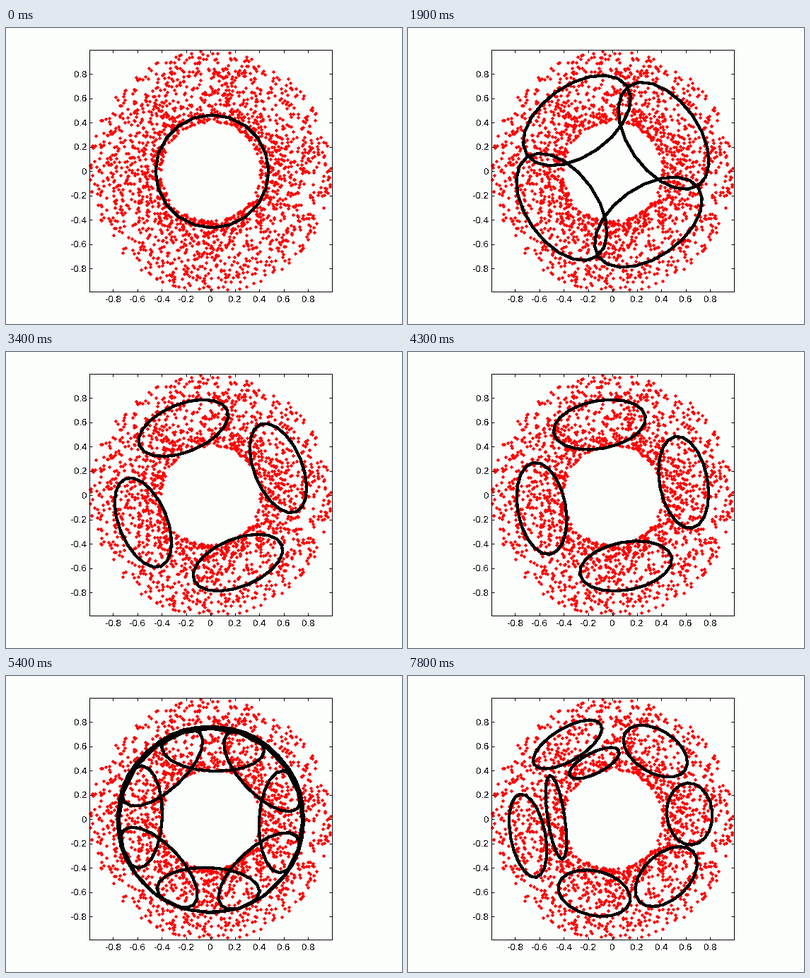
Animation, 560 px wide and 420 px high, one loop 8000 ms. Source, as a matplotlib script:

```python
import numpy as np
import matplotlib.pyplot as plt
from matplotlib.animation import FuncAnimation

W, H, DPI = 560, 420, 100
STEP, LOOP = 100, 8000
LEFT, RIGHT, TOP, BOTTOM = 118, 461, 31, 374
CX, CY, UNIT = 289, 203, 172.5          # pixel of the data origin, pixels per unit
PAPER = "#fcfefc"
PX = 72 / DPI


# A pose has one row per ellipse: angle around the origin (degrees), distance
# from it, half length across the radius, half width along it, extra turn.
def pose(angle, dist, a, b, turn=0):
    return np.column_stack(np.broadcast_arrays(angle, dist, a, b, turn)).astype(float)


def ring(n, phase, dist, a, b):
    return pose(phase + 360 / n * np.arange(n), dist, a, b)


def weave(p, q):
    """Alternate the rows of two poses."""
    return np.stack([p, q], axis=1).reshape(-1, p.shape[1])


def mix(p, q, u):
    return p + (q - p) * u


TWO = ring(2, 123, 74, 101, 53)
FOUR_WIDE = weave(ring(2, 33, 50, 175, 150), TWO)
FOUR_OPEN = ring(4, 35, 88, 86, 50)
FOUR_MID = ring(4, 22, 103, 67, 34)
FOUR_LATE = ring(4, 10.5, 102, 66, 34)
FOUR_LAST = ring(4, 5, 101, 69, 32.5)
EIGHT = ring(8, -2, 100, 72.5, 31.5)

# Two pairs end up one behind the other; the inner one is thin and turned.
END_DIST = np.array([109, 114, 84, 124, 80, 122, 108, 111])
END = pose([4, 58, 108, 121, 178, 191, 256, 313], END_DIST,
           [44, 50, 39, 55, 60, 60, 52, 52],
           33 - 0.7 * abs(END_DIST - 110), 0.35 * np.maximum(110 - END_DIST, 0))
SPREAD = pose(mix(EIGHT, END, 0.25)[:, 0], 101 + 11 * (np.arange(8) % 2), 57, 32)
NEAR = mix(EIGHT, SPREAD, 0.7)

# start, end, first pose, last pose, ease (higher: faster at first)
MOVES = [
    (0, 1, pose(0, [2], 80, 80), pose(0, [2], 80, 80), 0),
    (100, 101, pose(0, [2], 100, 100), pose(0, [2], 100, 100), 0),
    (400, 1200, ring(2, 123, 27, 100, 84), TWO, 2.5),
    (1600, 1900, FOUR_WIDE, FOUR_OPEN, 3),
    (1900, 3400, FOUR_OPEN, FOUR_MID, 1),
    (3400, 4300, FOUR_MID, FOUR_LATE, 0),
    (4300, 4800, FOUR_LATE, FOUR_LAST, 0),
    (4800, 5400, weave(FOUR_LAST, ring(4, 43, 100, 90, 55)), EIGHT, 2),
    (5400, 6000, EIGHT, NEAR, 0),
    (6200, 6700, NEAR, SPREAD, 0),
    (6700, 7800, SPREAD, END, 0),
]
HOOP = (4800, 5400, pose(270, [1], 205, 205), pose(270, [2], 130, 131), 3.5)
HOOP_END = 6200


def move(t, t0, t1, first, last, k):
    u = min(max((t - t0) / (t1 - t0), 0), 1)
    if k:
        u = (1 - np.exp(-k * u)) / (1 - np.exp(-k))
    return mix(first, last, u)


def shapes_at(t):
    rows = move(t, *[m for m in MOVES if m[0] <= t][-1])
    if HOOP[0] <= t < HOOP_END:
        rows = np.vstack([rows, move(t, *HOOP)])
    return rows


def outline(angle, dist, a, b, turn, n=20):
    place, tilt = np.radians(angle), np.radians(angle + 90 + turn)
    s = np.linspace(0, 2 * np.pi, n + 1)
    u, v = a * np.cos(s), b * np.sin(s)
    x = dist * np.cos(place) + u * np.cos(tilt) - v * np.sin(tilt)
    y = dist * np.sin(place) + u * np.sin(tilt) + v * np.cos(tilt)
    return x / UNIT, y / UNIT


plt.rcParams["font.family"] = "Liberation Sans"
plt.rcParams["text.antialiased"] = False

# The 0.4 keeps the frame lines from snapping to the next pixel.
fig = plt.figure(figsize=(W / DPI, H / DPI), dpi=DPI, facecolor=PAPER)
ax = fig.add_axes([(LEFT + 0.4) / W, 1 - (BOTTOM + 0.4) / H,
                   (RIGHT - LEFT) / W, (BOTTOM - TOP) / H], facecolor=PAPER)
ax.set_xlim((LEFT - CX) / UNIT, (RIGHT - CX) / UNIT)
ax.set_ylim((CY - BOTTOM) / UNIT, (CY - TOP) / UNIT)

ticks = np.arange(-4, 5) / 5
names = [f"{v:g}" for v in ticks]
ax.set_xticks(ticks, names)
ax.set_yticks(ticks, names)
ax.tick_params(direction="in", top=True, right=True, length=4 * PX,
               width=PX, labelsize=13.3 * PX)
ax.tick_params(axis="x", pad=6 * PX)
ax.tick_params(axis="y", pad=4 * PX)
for spine in ax.spines.values():
    spine.set_linewidth(PX)

# Points in an annulus, denser towards the hole.
rng = np.random.default_rng(12)
radius = 0.405 + 0.59 * rng.random(2000) ** 1.2
angle = rng.uniform(0, 2 * np.pi, 2000)
ax.plot(radius * np.cos(angle), radius * np.sin(angle), "D", color="#fc0204",
        markersize=3.9 * PX, markeredgewidth=0, antialiased=False,
        clip_on=False, zorder=1)

curves = [ax.plot([], [], color="black", linewidth=3.2 * PX, antialiased=False,
                  solid_joinstyle="round", zorder=2)[0] for _ in range(9)]


def draw(i):
    rows = shapes_at(i * STEP)
    for k, curve in enumerate(curves):
        curve.set_data(*(outline(*rows[k]) if k < len(rows) else ([], [])))
    return curves


anim = FuncAnimation(fig, draw, frames=LOOP // STEP, interval=STEP,
                     init_func=lambda: draw(0), repeat=True, repeat_delay=0)
plt.show()
```
